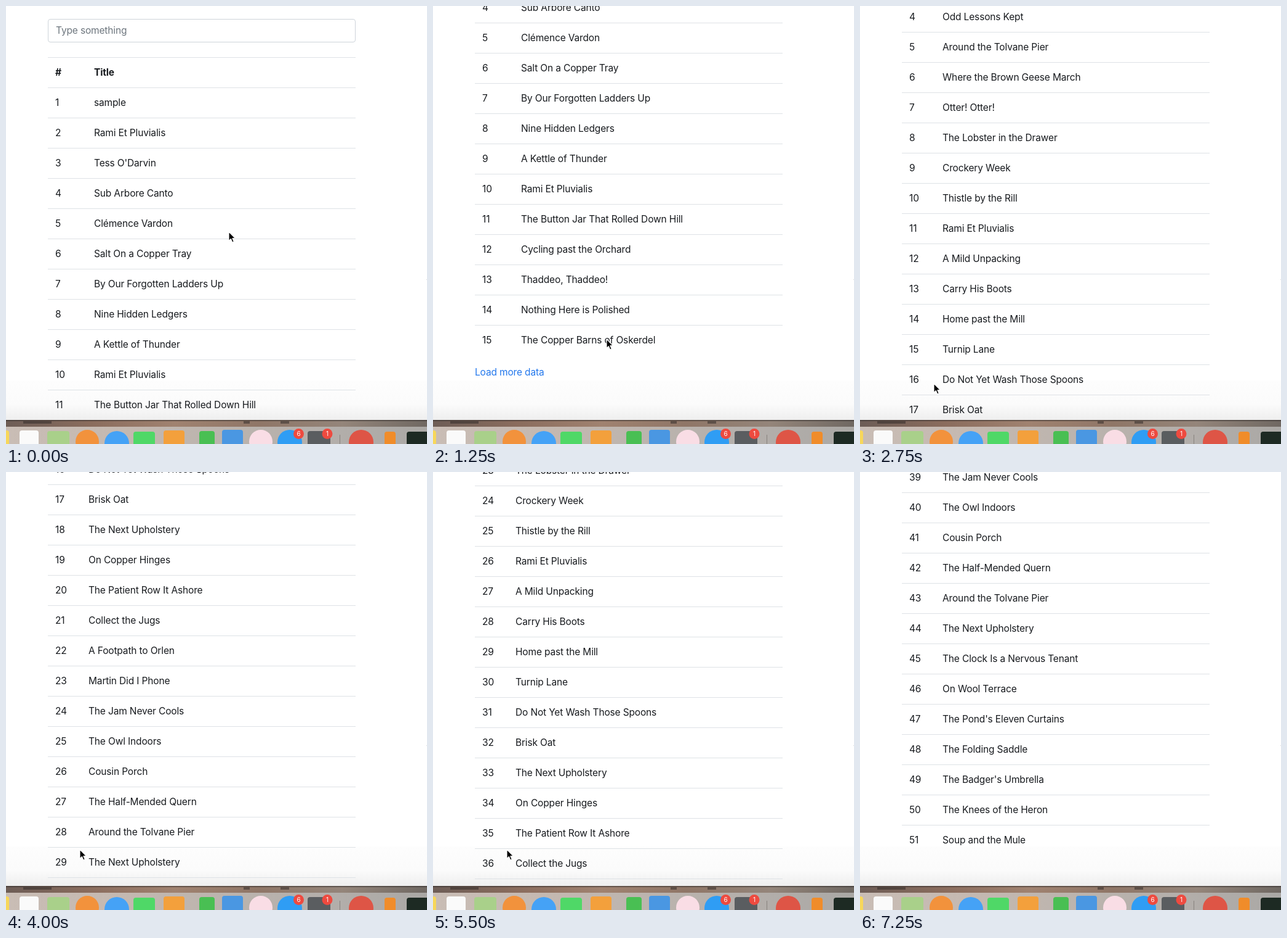
Write an HTML page with a canvas that moves like this. It is 684 px wide and 710 px high and loops after 7.5 s.

```html
<!DOCTYPE html>
<html lang="en">
<head>
<meta charset="utf-8">
<title>Title list</title>
<style>
  html, body { margin: 0; width: 684px; height: 710px; overflow: hidden; background: #fff; }
  #stage { position: relative; width: 684px; height: 710px; overflow: hidden; }
  #view { position: absolute; left: 0; top: 0; width: 684px; height: 671px; overflow: hidden;
    background: linear-gradient(#fff 606px, #fdfdfd 608px, #fbfbfb 645px, #eee 671px);
    font: 15.5px/24px Inter, "Noto Sans", sans-serif; letter-spacing: -.15px; color: #171a1e; }
  #page { position: absolute; left: 68px; top: 0; width: 500px; }
  #search { position: absolute; top: 21px; width: 500px; height: 38px; box-sizing: border-box; padding: 6px 12px;
    border: 1px solid #ced4da; border-radius: 4px; background: #fff; color: #6c757d; }
  .list { position: absolute; top: 83px; width: 500px; --col: 66px; }
  .list.wide { --col: 75px; }
  .row { position: relative; height: 48px; border-top: 1px solid #dee2e6; }
  .row span { position: absolute; top: 12px; left: 12px; white-space: pre; }
  .row span + span { left: var(--col); }
  .head { font-weight: 700; }
  .more { margin-top: 16px; color: #2277ec; }
  .hover .more { color: #0056b3; text-decoration: underline; }
  canvas, svg { position: absolute; left: 0; top: 0; }
  svg { overflow: visible; }
</style>
</head>
<body>
<div id="stage">
  <div id="view">
    <div id="page"><div id="search">Type something</div></div>
  </div>
  <canvas id="dock" width="684" height="710"></canvas>
  <svg id="pointer" width="20" height="24">
    <path id="arrow" d="M0 0V14.6L3.4 11.5 5.7 17 8.2 16 5.9 10.6H10.4Z"
      fill="#000" stroke="#fff" stroke-width="1.1" stroke-linejoin="round"/>
    <path id="hand" d="M-1 0Q.5-1.6 2 0V5.5Q4 4.4 5 6 7 5.2 8 6.9 10 6.4 10 8.4V12Q9.5 14 8.4 15.5V17H.8Q-.6 13.8-4.4 10 -4.6 7.6-2.4 8.6L-1 10Z"
      fill="#fff" stroke="#000" stroke-width="1.1" stroke-linejoin="round"/>
  </svg>
</div>
<script>
const $ = id => document.getElementById(id);

const titles = (
  "sample|Rami Et Pluvialis|Tess O'Darvin|Sub Arbore Canto|Clémence Vardon|Salt On a Copper Tray|" +
  "By Our Forgotten Ladders Up|Nine Hidden Ledgers|A Kettle of Thunder|Rami Et Pluvialis|" +
  "The Button Jar That Rolled Down Hill|Cycling past the Orchard|Thaddeo, Thaddeo!|" +
  "Nothing Here is Polished|The Copper Barns of Oskerdel|" +
  "Seven Wet Gloves|A Lamp for Breakfast|The Sleepy Cartwright|Odd Lessons Kept|" +
  "Around the Tolvane Pier|Where the Brown Geese March|Otter! Otter!|The Lobster in the Drawer|" +
  "Crockery Week|Thistle by the Rill|Rami Et Pluvialis|A Mild Unpacking|Carry His Boots|" +
  "Home past the Mill|Turnip Lane|Do Not Yet Wash Those Spoons|Brisk Oat|The Next Upholstery|" +
  "On Copper Hinges|The Patient Row It Ashore|Collect the Jugs|A Footpath to Orlen|" +
  "Martin Did I Phone|The Jam Never Cools|The Owl Indoors|Cousin Porch|The Half-Mended Quern|" +
  "Around the Tolvane Pier|The Next Upholstery|The Clock Is a Nervous Tenant|On Wool Terrace|" +
  "The Pond's Eleven Curtains|The Folding Saddle|The Badger's Umbrella|The Knees of the Heron|" +
  "Soup and the Mule"
).split("|");

function add(parent, cls, text = "") {
  const el = document.createElement(cls ? "div" : "span");
  if (cls) el.className = cls;
  el.textContent = text;
  return parent.appendChild(el);
}

function addRow(list, num, title, cls = "row") {
  const row = add(list, cls);
  add(row, "", num);
  add(row, "", title);
}

function makeList(items, cls, hasMore) {
  const list = add($("page"), cls);
  addRow(list, "#", "Title", "row head");
  items.forEach((title, i) => addRow(list, i + 1, title));
  if (hasMore) add(list, "more", "Load more data");
  return list;
}

const lists = [
  makeList(titles.slice(0, 15), "list wide", true),
  makeList(titles.slice(15, 45), "list", true),
  makeList(titles, "list", false)
];

// Tracks: [tick, value...], held until the next entry; one tick is 250 ms.
const TICK = 250, LOOP = 7500;
const scroll = [[0, 0], [1, 28], [2, 120], [3, 235], [4, 322], [5, 301], [6, 290], [7, 286],
  [14, 420], [15, 650], [16, 896], [17, 1036], [18, 1021],
  [22, 1237], [23, 1760], [24, 2016], [25, 2012], [26, 2010]];
const shown = [[0, 0], [10, 1], [19, 2]];
const place = [[0, 362, 366], [4, 350, 400], [5, 282, 540], [6, 160, 606], [7, 120, 612],
  [27, 330, 330], [28, 578, 24], [29, 600, -60]];
const hover = [[0, false], [7, true], [11, false], [18, true], [20, false]];

const at = (track, tick) => track.filter(k => k[0] <= tick).pop();

function drawDock() {
  const c = $("dock").getContext("2d");
  const box = (x, y, w, h, color) => { c.fillStyle = color; c.fillRect(x, y, w, h); };
  const disc = (x, y, r, color) => {
    c.fillStyle = color;
    c.beginPath();
    c.arc(x, y, r, 0, 7);
    c.fill();
  };
  const tile = (x, y, w, color) => {
    c.fillStyle = color;
    c.beginPath();
    c.roundRect(x, y, w, 40, 4);
    c.fill();
  };
  const fade = (...colors) => {
    const g = c.createLinearGradient(0, 0, 684, 0);
    colors.forEach((color, i) => g.addColorStop(i / (colors.length - 1), color));
    return g;
  };

  // Desktop strip
  box(0, 671, 684, 39, fade("#6d5d56", "#8a6c5d", "#a08270", "#8f7667", "#94857a", "#6f6862"));
  box(0, 671, 684, 2, "rgba(45,38,36,.5)");
  [[28, 46], [386, 10], [446, 14]].forEach(([x, w]) => box(x, 673, w, 4, "rgba(45,38,36,.5)"));
  box(0, 682, 684, 28, fade("#c9bdb5", "#c5b9b1", "#bcb4ae", "#b4afab", "#aaa8a5"));

  tile(-30, 688, 35, "#f7d75a");
  tile(22, 688, 31, "#fafafa");
  tile(67, 689, 36, "#a9d08a");
  disc(132, 706, 19, "#f2923c");
  disc(180, 709, 20, "#45a2f6");
  tile(207, 690, 35, "#4fd867");
  tile(256, 688, 34, "#f3a03c");
  tile(314, 689, 25, "#49bf53");
  tile(351, 687, 34, "#4a97e2");
  disc(414, 706, 19, "#f9dde5");
  disc(461, 707, 20, "#2f9df4");
  tile(490, 689, 37, "#5a5d60");
  box(542, 695, 1, 15, "#87827e");
  disc(577, 707, 20, "#de5546");
  tile(615, 690, 18, "#f08c2a");
  tile(651, 690, 40, "#1d2a23");

  c.font = "10px Inter, sans-serif";
  c.textAlign = "center";
  [[475.5, "6"], [522, "1"]].forEach(([x, n]) => {
    disc(x, 693.5, 8.5, "#ee4a3f");
    c.fillStyle = "#fff";
    c.fillText(n, x, 697);
  });

  box(683, 443, 1, 1, "#d8d8d8");
}

function render(now) {
  const tick = Math.floor((now % LOOP) / TICK);
  const [, current] = at(shown, tick);
  const [, x, y] = at(place, tick);
  const [, over] = at(hover, tick);
  $("page").style.transform = `translateY(${-at(scroll, tick)[1]}px)`;
  lists.forEach((list, i) => list.style.display = i === current ? "" : "none");
  $("page").classList.toggle("hover", over);
  $("arrow").style.display = over ? "none" : "";
  $("hand").style.display = over ? "" : "none";
  $("pointer").style.transform = `translate(${x}px, ${y}px)`;
}

drawDock();
const start = performance.now();
function loop() {
  render(performance.now() - start);
  requestAnimationFrame(loop);
}
loop();
</script>
</body>
</html>
```
